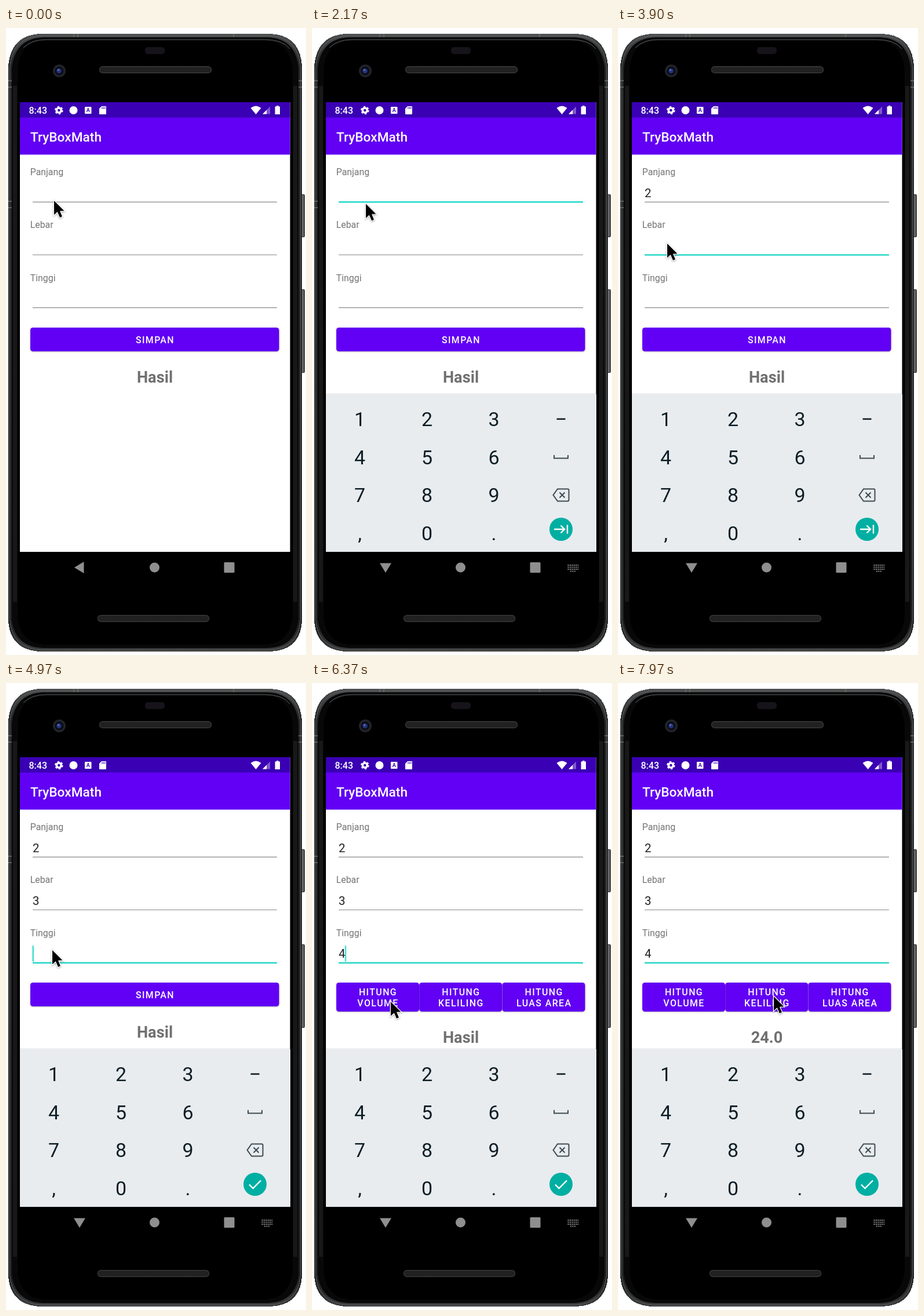
Write an HTML page that moves like this. It is 518x1082 px and loops after 8000 ms.

```html
<!DOCTYPE html>
<html lang="id">
<head>
<meta charset="utf-8">
<title>Box calculator</title>
<style>
html, body { margin: 0; height: 100%; overflow: hidden; background: #fff; }
svg { display: block; width: 518px; height: 1082px; font-family: Roboto, sans-serif; }

.label { font-size: 15.9px; fill: #757575; }
.value { font-size: 20.4px; fill: #222; }
.rule { stroke: #8a8a8a; stroke-width: 1.2; }
.btn { fill: #6100f4; filter: drop-shadow(0 1.5px 1px rgba(0,0,0,.28)); }
.caps { font-size: 15.9px; font-weight: 500; letter-spacing: 1.42px; fill: #fff; text-anchor: middle; }
.result { font-size: 27.2px; font-weight: 700; fill: #707070; text-anchor: middle; }
.keys { font-size: 34px; fill: #0e1d25; text-anchor: middle; }
.icon { fill: none; stroke: #3d4a51; stroke-width: 2; }

/* hard changes */
.step { animation: 8s step-end infinite; }
#focus { animation-name: focus; }
#caret { animation-name: blink; }
#caretX { animation-name: caretX; }
#v1 { animation-name: type1; }
#v2 { animation-name: type2; }
#v3 { animation-name: type3; }
#save { animation-name: save; }
#choices { animation-name: choices; }
#result { animation-name: drop; }
#before { animation-name: before; }
#after { animation-name: after; }
#next { animation-name: next; }
#done { animation-name: done; }
#imeIcon { animation-name: ime; }

/* smooth moves */
#keyboard { animation: slide 8s ease-out infinite; }
#back { animation: turn 8s ease-in-out infinite; transform-origin: 127px 931px; }
#pointer { animation: point 8s ease-in-out infinite; }
#pressSave { animation: pressSave 8s linear infinite; }
#pressVolume { animation: pressVolume 8s linear infinite; }

@keyframes focus {
  0% { visibility: hidden; transform: none; }
  19.5% { visibility: visible; transform: none; }
  41.75% { visibility: visible; transform: translateY(91.3px); }
  59%, 100% { visibility: visible; transform: translateY(182.6px); }
}
@keyframes blink {
  0%, 19.5%, 31%, 41.75%, 49.5%, 59%, 66%, 78.5%, 91% { opacity: 1; }
  25.75%, 37.25%, 48%, 55.75%, 65.25%, 72.25%, 84.75%, 97.25%, 100% { opacity: 0; }
}
@keyframes caretX {
  0%, 41.75%, 59% { transform: none; }
  31%, 49.5%, 66%, 100% { transform: translateX(11.2px); }
}
@keyframes type1 { 0% { visibility: hidden; } 31%, 100% { visibility: visible; } }
@keyframes type2 { 0% { visibility: hidden; } 49.5%, 100% { visibility: visible; } }
@keyframes type3 { 0% { visibility: hidden; } 66%, 100% { visibility: visible; } }
@keyframes save { 0%, 83.1% { visibility: visible; } 72.5%, 95.5%, 100% { visibility: hidden; } }
@keyframes choices { 0%, 83.1% { visibility: hidden; } 72.5%, 95.5%, 100% { visibility: visible; } }
@keyframes drop { 0%, 83.1% { transform: none; } 72.5%, 95.5%, 100% { transform: translateY(8.7px); } }
@keyframes before { 0% { visibility: visible; } 83.1%, 100% { visibility: hidden; } }
@keyframes after { 0% { visibility: hidden; } 83.1%, 100% { visibility: visible; } }
@keyframes next { 0% { visibility: visible; } 59%, 100% { visibility: hidden; } }
@keyframes done { 0% { visibility: hidden; } 59%, 100% { visibility: visible; } }
@keyframes ime { 0% { visibility: hidden; } 23%, 100% { visibility: visible; } }

@keyframes slide { 0%, 22% { transform: translateY(276px); } 25.2%, 100% { transform: none; } }
@keyframes turn { 0%, 22% { transform: none; } 25%, 100% { transform: rotate(-90deg); } }
@keyframes pressSave { 0%, 70%, 72.6%, 93.3%, 95.6%, 100% { opacity: 0; } 71.2%, 72.5%, 94.3%, 95.5% { opacity: .2; } }
@keyframes pressVolume { 0%, 81%, 83.2%, 100% { opacity: 0; } 82%, 83.1% { opacity: .2; } }
@keyframes point {
  0% { transform: translate(83px, 298px); }
  15.875%, 20% { transform: translate(95px, 282px); }
  28% { transform: translate(93px, 304px); }
  35.375% { transform: translate(92px, 313px); }
  41%, 50% { transform: translate(85px, 372px); }
  58.5%, 63% { transform: translate(80px, 461px); }
  70%, 72.5% { transform: translate(148px, 536px); }
  79.625%, 83% { transform: translate(136px, 550px); }
  89%, 94.5% { transform: translate(166px, 551px); }
  99.625%, 100% { transform: translate(269px, 541px); }
}
</style>
</head>
<body>
<svg viewBox="0 0 518 1082">
  <defs>
    <linearGradient id="side">
      <stop offset="0" stop-color="#8a8a8a"/><stop offset="1" stop-color="#4a4a4a"/>
    </linearGradient>
    <linearGradient id="rim" x2="0" y2="1">
      <stop offset="0" stop-color="#4d4f50"/><stop offset=".05" stop-color="#222425"/>
      <stop offset=".95" stop-color="#1c1d1e"/><stop offset="1" stop-color="#3a3b3c"/>
    </linearGradient>
    <pattern id="mesh" width="3" height="3" patternUnits="userSpaceOnUse">
      <rect width="3" height="3" fill="#262626"/><rect width="1.5" height="1.5" fill="#111"/>
    </pattern>
    <clipPath id="screen"><rect x="24" y="128" width="466.5" height="776"/></clipPath>
  </defs>

  <!-- phone body -->
  <g fill="url(#side)" stroke="#222">
    <rect x="509" y="287.5" width="6.5" height="73" rx="1"/>
    <rect x="509" y="451.5" width="6.5" height="143" rx="1"/>
  </g>
  <path shape-rendering="crispEdges" fill="url(#rim)" d="M60 10H456Q508 12 511 66V1024Q508 1074 456 1076H60Q8 1074 4 1024V66Q8 12 60 10Z"/>
  <path fill="none" stroke="#5c5e5f" d="M62 13H454Q505 15 508.500 68V1022Q505 1071 454 1073.500H62Q11 1071 6.500 1022V68Q11 15 62 13Z"/>
  <path fill="#080808" d="M64 16H452Q501 18 505 70V1020Q501 1068 452 1070H64Q15 1068 10 1020V70Q15 18 64 16Z"/>
  <path fill="none" stroke="#606264" d="M30 34Q44 20 70 20H446Q478 20 490 36"/>
  <path fill="url(#mesh)" opacity=".65" d="M12 100h7v890h-7zM496 100h7v890h-7z"/>
  <path fill="#000" d="M64 22H450Q490 24 495 72V1016Q490 1060 450 1064H64Q24 1060 20 1016V72Q24 24 64 22Z"/>
  <path stroke="#6b6d6e" stroke-width="1.500" d="M4 91h6M4 102h6M505 91h6M505 102h6M4 299h6M4 310h6M117 10v6M124 10v6M393 10v6"/>

  <rect x="240" y="33" width="34" height="12" rx="5" fill="#17131b"/>
  <circle cx="92" cy="74" r="11" fill="#222429"/>
  <circle cx="92" cy="74" r="7.500" fill="#0b0d18"/>
  <circle cx="91.500" cy="74" r="4.300" fill="#24337c"/>
  <circle cx="90.500" cy="72.500" r="1.500" fill="#6878c9"/>
  <g fill="url(#mesh)" stroke="#484848">
    <rect x="161.500" y="66.500" width="193" height="11" rx="5"/>
    <rect x="158.500" y="1013.500" width="192" height="11" rx="5"/>
  </g>

  <g clip-path="url(#screen)">
    <path fill="#fff" d="M24 128h467v776H24z"/>
    <path fill="#6100f4" d="M24 154h467v64.500H24z"/>
    <path fill="#3a00b4" d="M24 128h467v26.500H24z"/>

    <!-- status bar -->
    <g fill="#fff">
      <text x="39.500" y="148" font-size="16" font-weight="500">8:43</text>
      <circle cx="91.300" cy="142" r="4" fill="none" stroke="#fff" stroke-width="3.600"/>
      <circle cx="91.300" cy="142" r="6.300" fill="none" stroke="#fff" stroke-width="2" stroke-dasharray="3.300 3.300"/>
      <circle cx="116.500" cy="142" r="7"/>
      <rect x="136" y="136" width="11.500" height="12" rx="1"/>
      <text x="141.700" y="145.300" font-size="9" font-weight="700" text-anchor="middle" style="fill:#3a00b4">A</text>
      <path d="M165 135h7q1 0 1 1v12q0 1-1 1h-10q-1 0-1-1v-9z"/>
      <path d="M422.500 138Q431.500 131 440.500 138L431.500 149Z"/>
      <path d="M456 135.500V148.500H443Z" opacity=".35"/>
      <path d="M450 141.500V148.500H443Z"/>
      <path d="M467 134h3.500v1.500h2.500v13.500h-8.500v-13.500h2.500z"/>
    </g>
    <path stroke="#3a00b4" stroke-width="1.200" d="M166 136.500v3M168.500 136.500v3M171 136.500v3"/>
    <text x="42" y="195.500" font-size="22.700" font-weight="500" fill="#fff">TryBoxMath</text>

    <!-- form -->
    <g class="label">
      <text x="41.700" y="254">Panjang</text>
      <text x="41.700" y="345.300">Lebar</text>
      <text x="41.700" y="436.600">Tinggi</text>
    </g>
    <path class="rule" d="M46 300.300H468M46 391.500H468M46 482.700H468"/>
    <g class="value">
      <text id="v1" class="step" x="46" y="291.500">2</text>
      <text id="v2" class="step" x="46" y="383">3</text>
      <text id="v3" class="step" x="46" y="474">4</text>
    </g>
    <g id="focus" class="step" fill="#12d9c7">
      <rect x="46" y="299.200" width="422" height="2.300"/>
      <g id="caretX" class="step"><rect id="caret" class="step" x="45.700" y="270.500" width="2" height="27.500"/></g>
    </g>

    <g id="save" class="step">
      <rect class="btn" x="42" y="517" width="429.500" height="41" rx="4.500"/>
      <rect id="pressSave" x="42" y="517" width="429.500" height="41" rx="4.500" fill="#fff"/>
      <text class="caps" x="257.500" y="543.700">SIMPAN</text>
    </g>
    <g id="choices" class="step">
      <rect class="btn" x="42" y="517" width="143" height="50" rx="4.500"/>
      <rect class="btn" x="185.200" y="517" width="143" height="50" rx="4.500"/>
      <rect class="btn" x="328.500" y="517" width="143" height="50" rx="4.500"/>
      <rect id="pressVolume" x="42" y="517" width="143" height="50" rx="4.500" fill="#fff"/>
      <g class="caps">
        <text x="114" y="539.300">HITUNG</text><text x="114" y="557.700">VOLUME</text>
        <text x="257.400" y="539.300">HITUNG</text><text x="257.400" y="557.700">KELILING</text>
        <text x="400.700" y="539.300">HITUNG</text><text x="400.700" y="557.700">LUAS AREA</text>
      </g>
    </g>
    <g id="result" class="step result">
      <text id="before" class="step" x="257" y="612">Hasil</text>
      <text id="after" class="step" x="257" y="612">24.0</text>
    </g>

    <!-- number pad -->
    <g id="keyboard">
      <path fill="#000" opacity=".06" d="M24 630h467v3H24z"/>
      <path fill="#e8ecef" d="M24 632h467v273H24z"/>
      <g class="keys">
        <text x="82.500" y="687">1</text><text x="198.500" y="687">2</text><text x="314" y="687">3</text>
        <text x="82.500" y="752.500">4</text><text x="198.500" y="752.500">5</text><text x="314" y="752.500">6</text>
        <text x="82.500" y="818">7</text><text x="198.500" y="818">8</text><text x="314" y="818">9</text>
        <text x="82.500" y="884">,</text><text x="198.500" y="884">0</text><text x="314" y="884">.</text>
      </g>
      <path fill="#0e1d25" d="M422.500 673.500h15v2.600h-15z"/>
      <path class="icon" stroke-width="2.400" d="M418 737v5.500h24V737"/>
      <path class="icon" d="M424 795.500H441.500q2 0 2 2V814.500q0 2-2 2H424L416.500 806ZM427.500 801.500l9 9M436.500 801.500l-9 9"/>
      <circle cx="430" cy="865" r="20" fill="#00afa2"/>
      <g fill="none" stroke="#fff" stroke-width="2.400">
        <path id="next" class="step" d="M418 865h18M429.500 858.500l6.500 6.500-6.500 6.500M441 857.500v15"/>
        <path id="done" class="step" d="M420 865.500l6.500 6.500 13.500-13.500"/>
      </g>
    </g>
  </g>

  <!-- navigation -->
  <g fill="#8f8f8f">
    <path id="back" d="M118 931L134.500 921V941Z"/>
    <circle cx="256.500" cy="931" r="8.500"/>
    <rect x="376.500" y="922" width="18" height="18" rx="1.500"/>
    <path id="imeIcon" class="step" fill="none" stroke="#8f8f8f" stroke-width="2" stroke-dasharray="2 1.400" d="M441.500 927h18.500M441.500 930.500h18.500M441.500 934h18.500M446 937.500h9"/>
  </g>

  <g id="pointer" style="filter:drop-shadow(0 1.500px 1.500px rgba(0,0,0,.35))">
    <path stroke="#fff" stroke-width="2.600" paint-order="stroke" d="M0 0V24.500L5.800 19.200L10 29L14 27.200L10 17.800L17.500 17.500Z"/>
  </g>
</svg>
</body>
</html>
```
